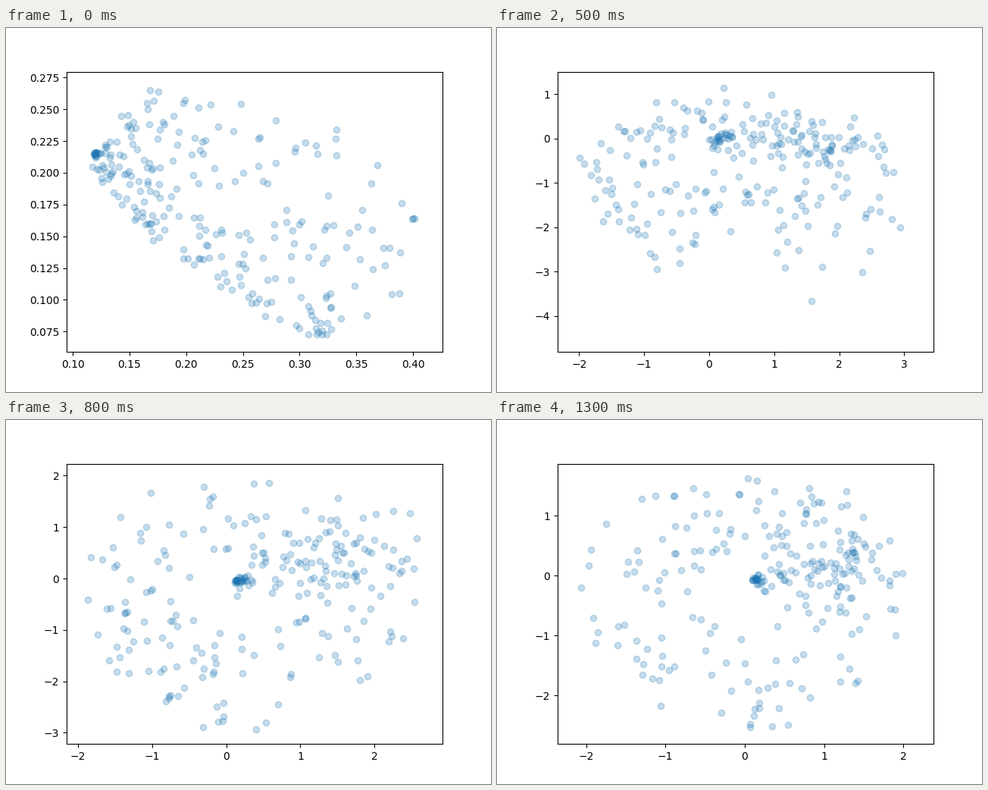
Animation, 640 px wide and 480 px high, one loop 1400 ms. Source, as a matplotlib script:

```python
import numpy as np
import matplotlib.pyplot as plt
from matplotlib.animation import FuncAnimation

FRAMES, INTERVAL = 14, 100
COUNT = 250
CORE, TRAIL, LOBE = 14, 18, 64
MARGIN = .05

# Frame: left, right, bottom, top of the point set.
BOUNDS = {
    0: (.1097, .4110, .0690, .2696),
    3: (-2.463, 3.480, -5.507, .470),
    6: (-1.870, 3.040, -4.035, 1.600),
    8: (-1.924, 2.687, -2.970, 1.985),
    10: (-2.100, 2.330, -2.943, 1.843),
    11: (-1.808, 2.520, -2.826, 1.721),
    13: (-2.143, 2.163, -2.595, 1.658),
}


def bounds_at(frame):
    return [np.interp(frame, list(BOUNDS), side) for side in zip(*BOUNDS.values())]


def mix(a, b, t):
    return a + (b - a) * t


def fan(rng):
    """Points spreading up and right from a dense curved edge."""
    s = rng.random(COUNT) ** 1.6
    s[:CORE] = 0
    reach = .055 + .03 * s + .08 * np.sin(np.pi * s)
    depth = reach * rng.random(COUNT) ** 2.1
    depth[:CORE] = 0
    x = .12 + .2 * s + depth
    y = .215 - .145 * s ** .6 + depth * (1 - .6 * s)
    spread = np.full((COUNT, 1), .003)
    spread[:CORE] = .0012
    return np.column_stack([x, y]) + rng.normal(0, 1, (COUNT, 2)) * spread


def arch(rng):
    """A dense arch with points hanging below it."""
    left, right, bottom, _ = bounds_at(3)
    x = mix(left, right, rng.beta(2, 2, COUNT))
    edge = .33 - np.where(x < .35, .62, .42) * np.abs(x - .35) ** 1.25
    floor = bottom + .3 * (x - .5) ** 2
    y = mix(edge, floor, rng.random(COUNT) ** 3.6)
    return np.column_stack([x, y + rng.normal(0, .08, COUNT)])


def cloud(rng, frame):
    """A tight core with a trail, a lobe to the right and a wide ring."""
    left, right, bottom, top = bounds_at(frame)
    core = rng.normal((.13, -.06), .025, (CORE, 2))
    trail = np.column_stack([.15 + rng.exponential(.16, TRAIL),
                             rng.normal(-.05, .08, TRAIL)])
    lobe = rng.normal((.45 * right, .18 * top), (.2 * right, .25 * top), (LOBE, 2))

    size = COUNT - CORE - TRAIL - LOBE
    angle = rng.uniform(0, 2 * np.pi, size)
    cos, sin = np.cos(angle), np.sin(angle)
    hole = np.where(sin < 0, .35, .25)
    radius = mix(hole, 1, rng.random(size) ** .8)
    ring = np.column_stack([radius * cos * np.where(cos > 0, right, -left),
                            radius * sin * np.where(sin > 0, top, -bottom)])
    return np.vstack([core, trail, lobe, ring])


def by_x(points):
    return points[np.argsort(points[:, 0])]


def points_at(frame):
    rng = np.random.default_rng(70 + frame)
    if frame < 3:
        return mix(by_x(fan(rng)), by_x(arch(rng)), frame / 3)
    if frame < 6:
        return mix(by_x(arch(rng)), by_x(cloud(rng, 6)), frame / 3 - 1)
    return cloud(rng, frame)


def padded(low, high):
    pad = MARGIN * (high - low)
    return low - pad, high + pad


def draw(frame):
    left, right, bottom, top = bounds_at(frame)
    ax.clear()
    ax.scatter(*points_at(frame).T, alpha=.25)
    ax.set(xlim=padded(left, right), ylim=padded(bottom, top))


fig, ax = plt.subplots(figsize=(6.4, 4.8), dpi=100)
animation = FuncAnimation(fig, draw, frames=FRAMES, init_func=lambda: None,
                          interval=INTERVAL, repeat=True, repeat_delay=0)
plt.show()
```
